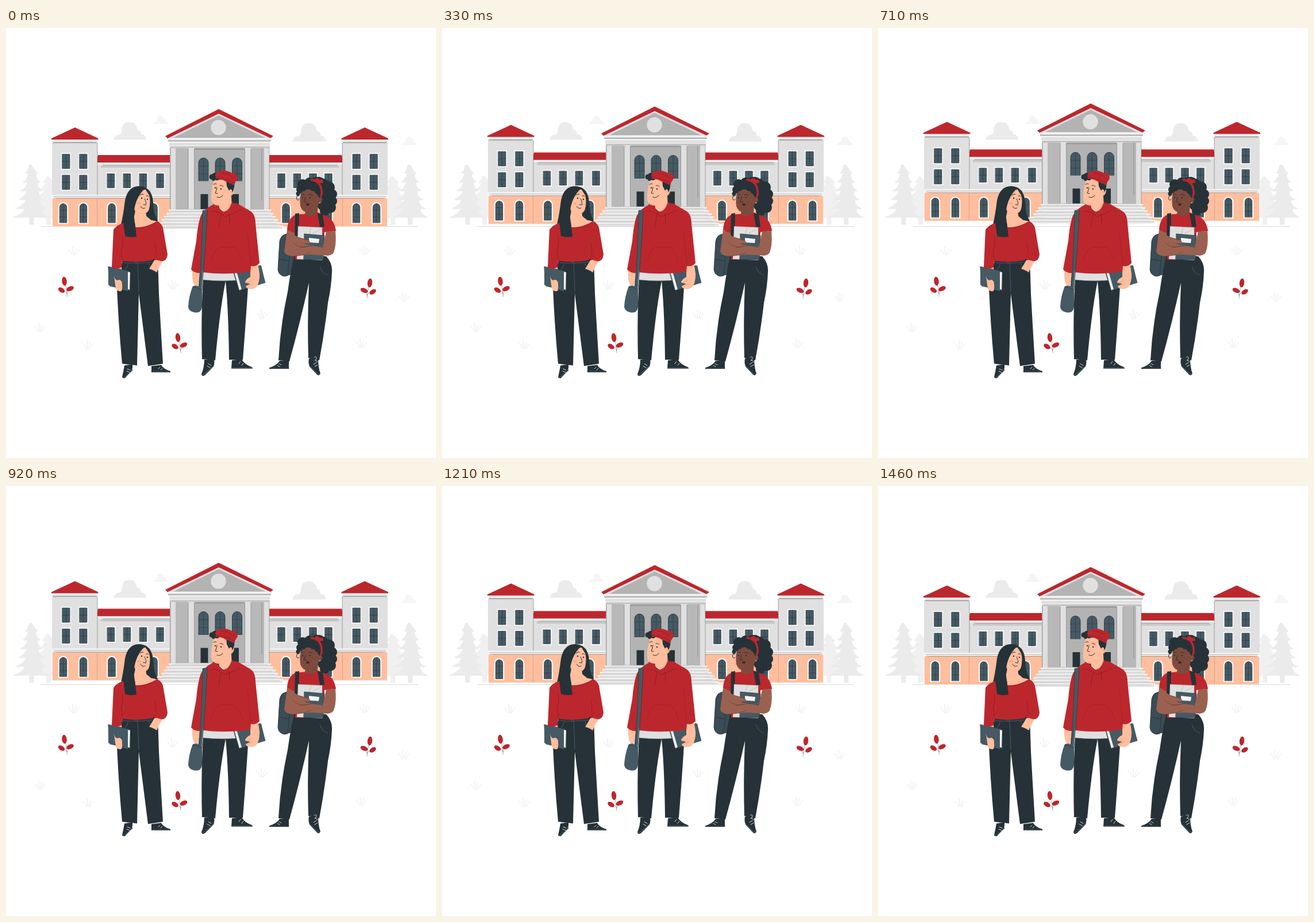
An HTML page for the animation above (1.5 s loop, 748 by 748 pixels).

```html
<!DOCTYPE html>
<html lang="en">
<head>
<meta charset="utf-8">
<title>Students on campus</title>
<style>
html, body { margin: 0; width: 100%; height: 100%; overflow: hidden; background: #fff; }
svg { display: block; width: 100vw; height: 100vh; }
</style>
</head>
<body>
<svg id="stage" viewBox="0 0 748 748"></svg>
<script>
const RED = '#bc272d', DARK = '#263238', SLATE = '#455a64', SKIN = '#ffbe9d', BROWN = '#9b6150',
  FACE = '#7d4b3e', LIGHT = '#e0e0e0', PALE = '#ebebeb', MID = '#c7c7c7', GREY = '#b3b3b3';

const fill = (d, color) => `<path d="${d}" fill="${color}"/>`;
const line = (d, color = DARK, w = .7) =>
  `<path d="${d}" fill="none" stroke="${color}" stroke-width="${w}" stroke-linecap="round" stroke-linejoin="round"/>`;
const rect = (x, y, w, h, color) => `<rect x="${x}" y="${y}" width="${w}" height="${h}" fill="${color}"/>`;
const oval = (x, y, rx, ry, color, turn = 0) =>
  `<ellipse cx="${x}" cy="${y}" rx="${rx}" ry="${ry}" fill="${color}" transform="rotate(${turn} ${x} ${y})"/>`;
const dots = (list, color) => list.map(([x, y, r]) => oval(x, y, r, r, color)).join('');
const place = (x, y, art, scale = '1') => `<g transform="translate(${x} ${y}) scale(${scale})">${art}</g>`;
const mirror = art => place(744, 0, art, '-1 1');

// Scenery
function cloud(x, y, w, color) {
  const k = w / 56;
  return place(x, y, fill('M0 0Q1-9 10-9Q13-10 14-15Q14-31 27-31Q39-31 41-17Q47-18 47-10Q56-9 56 0Z', color), k);
}

function tree(x, top, bottom, color) {
  const h = bottom - top, tiers = 6;
  let left = '', right = '';
  for (let i = 1; i <= tiers; i++) {
    const y = top + h * i / tiers, w = 7 + 4.2 * i, inner = w * .68;
    right += `Q${x + w * .5} ${y - 6} ${x + w} ${y - 1}Q${x + w - 3} ${y + 1} ${x + inner} ${y}`;
    left = `L${x - inner} ${y}Q${x - w + 3} ${y + 1} ${x - w} ${y - 1}Q${x - w * .5} ${y - 6} ${x - inner * .55} ${y - h / tiers}` + left;
  }
  return fill(`M${x} ${top}${right}${left}Z`, color) + rect(x - 4, bottom - 2, 8, 344 - bottom, color);
}

const grass = ([x, y]) => place(x, y,
  line('M-9-3Q-5 1-3 7M-2-8Q-2 0-1 7M4-5Q1 1 1 7M9-2Q5 2 3 7', LIGHT, .7));

const plant = (x, y, flip = 1) => place(x, y,
  line('M-1-8Q2 4 3 17M3 13Q0 6-6 5M3 12Q4 5 10 4', '#888', .7) +
  oval(-2, -9.5, 4.2, 7.7, RED, -7) + oval(-7, 6, 6.3, 3.8, RED, 32) + oval(8, 3.5, 6.8, 3.8, RED, -25), `${flip} 1`);

const scenery = cloud(187.5, 194.5, 56, PALE) + cloud(256, 167, 26, '#f5f5f5') + cloud(498.5, 197.5, 58, PALE) +
  cloud(688, 203.5, 26, '#f5f5f5') +
  tree(74, 258, 330, '#f0f0f0') + tree(44.5, 238, 330, PALE) +
  tree(673, 258, 330, '#f0f0f0') + tree(703, 238, 330, PALE) +
  line('M61 345.5H716', '#d0d0d0', .8);

// Building
const pane = (x, y, w, h) => rect(x - w / 2 - 2, y - 2, w + 4, h + 4, '#fff') + rect(x - w / 2, y, w, h, SLATE) +
  line(`M${x} ${y}v${h}M${x - w / 2} ${y + h / 2}h${w}`, DARK, .6) +
  line(`M${x - w / 2} ${y}h${w}v${h}h${-w}Z`, DARK, .7);

function arch(x, y, w, h, trim) {
  const shape = (r, top, bottom) => `M${x - r} ${bottom}V${top + r}A${r} ${r} 0 0 1 ${x + r} ${top + r}V${bottom}Z`;
  return (trim ? fill(shape(w / 2 + 2.5, y - 2.5, y + h + 2.5), '#fff') : '') +
    fill(shape(w / 2, y, y + h), SLATE) + line(shape(w / 2, y, y + h), DARK, .8) +
    line(`M${x} ${y}v${h}M${x - w / 2} ${y + h * .35}h${w}M${x - w / 2} ${y + h * .7}h${w}`, DARK, .5);
}

const wing =
  rect(158, 237, 129, 58, LIGHT) + rect(160, 234, 130, 4, '#f2f2f2') + rect(165, 239, 122, 4, MID) +
  line('M168 238.5H290', '#777', .6) +
  fill('M160 221H290L292.5 234H157Z', RED) + line('M290 221L292.5 234', DARK, .5) +
  rect(81, 297, 205, 48.5, SKIN) + rect(80, 199, 79, 93, LIGHT) +
  rect(82, 194, 76, 2, LIGHT) + rect(79, 196, 81, 2, '#f4f4f4') + rect(82, 198, 76, 3, MID) +
  line('M82 199H157', '#777', .6) + line('M159 200V291', '#666', .6) +
  fill('M79 194V192L120 173L160.5 192V194Z', RED) +
  rect(79, 290, 207, 6, '#f4f4f4') + rect(83, 292.5, 203, 1.5, MID) + rect(83, 295.5, 203, 1.5, '#d8bcae') +
  line('M88 296.5H286', '#8b7770', .5) +
  [104.5, 134.5].map(x => pane(x, 219.5, 13, 25) + pane(x, 256, 13, 25)).join('') +
  [99.5, 134.5, 184, 257].map(x => arch(x, 305.5, 12.5, 33, true)).join('') +
  line('M158.5 297V345', '#a98a7a', .5) + rect(79, 345, 200, 1, PALE);

const wings = wing + mirror(wing) +
  [182.5, 210.5, 238.5, 268, 479, 506.5, 534, 561].map(x => pane(x, 253.5, 12.5, 24.5)).join('');

const column = x => rect(x, 209, 10.5, 106, LIGHT) + rect(x - 1, 207, 12.5, 3, PALE) +
  line(`M${x} 210V314M${x + 10.5} 210V314`, '#777', .6);

const facade =
  rect(285, 200, 173, 118, '#b8b8b8') + rect(286, 209, 9, 107, LIGHT) + rect(449, 209, 9, 107, LIGHT) +
  line('M286 209V316M458 209V316M445 210V300', '#777', .6) +
  rect(328, 209, 88, 107, GREY) + rect(328, 209, 88, 3, '#9d9d9d') +
  [343.5, 372.5, 402].map(x => arch(x, 226, 17, 39.5)).join('') +
  rect(338.5, 289, 13, 26, DARK) + rect(391, 289, 14, 26, DARK) + rect(360, 289, 24, 26, DARK) +
  column(317) + column(415.5) +
  fill('M279 190L371 144L463 190L461 194H281Z', LIGHT) + fill('M291 191L370 152L451 191Z', GREY) +
  oval(369.5, 173, 13.2, 13.2, LIGHT) +
  rect(280, 191.5, 182, 3, '#f4f4f4') + rect(282, 194.5, 179, 3, MID) + rect(284, 197.5, 175, 2, '#fafafa') +
  rect(284, 199.5, 175, 6, LIGHT) + rect(282, 205, 178, 2, '#fafafa') + rect(285, 207, 174, 2, MID) +
  line('M286 206.5H458M283 197H460', '#888', .6) +
  fill('M277 188L370 141L465 188L460 191.5L370 149L281 192Z', RED);

const stairs = [0, 1, 2, 3, 4, 5].map(i => {
  const y = 316 + i * 5.5, x = 284 - i * 4.2, w = 176 + i * 8.4;
  return rect(x - 1, y, w + 2, 2.2, '#f7f7f7') + rect(x, y + 2.2, w, 3.7, i % 2 ? LIGHT : '#d9d9d9') +
    line(`M${x + 4} ${y + 2.2}h${w - 10}`, '#aaa', .5);
}).join('');

// People
const book = (cover, pages, label) => fill(cover, SLATE) + line(cover, DARK, .6) + fill(pages, '#f2f2f2') + label;

const leftStudent =
  fill('M232 275Q212 275 207 300Q204 325 200 342L240 350L264 336Q256 322 256 303Q254 276 232 275Z', DARK) +
  fill('M225 318L222 332Q207 337 202 344Q230 360 265 337Q250 334 244 327L243 316Z', SKIN) +
  fill('M224 287Q220 309 225 320Q235 327 245 321Q251 316 252 300Q252 286 245 281Q234 280 224 287Z', SKIN) +
  fill('M224 282Q233 276 242 279Q225 294 222 323L227 362Q216 364 206 362L201 341Q209 323 213 301Q216 287 224 282Z', DARK) +
  fill('M241 278Q253 283 253 305Q254 325 264 336L252 334Q246 330 249 316Q252 300 249 291Z', DARK) +
  line('M233 291q3-3 6-2M244 292q3-1 4 1M241 297Q245 305 243 308L239 307M234 310Q238 316 242 313', DARK, 1) +
  dots([[236, 296, 1.2], [246, 298, 1.2]], DARK) + oval(231, 305, 3, 2, '#ffa889') +
  // trousers and shoes
  fill('M206 587L220 585Q221 595 216 599L207 609Q203 610 202 607Q204 599 206 587Z', DARK) +
  fill('M253 588L270 586Q273 593 286 597V599H253Z', DARK) +
  line('M203 608L207 607L220 595M253 597.5H285', SLATE, 1.2) +
  line('M210 597l5 2M211 593l5 2M268 590l-3 3M272 592l-3 3', '#fff', .8) +
  fill('M203 403Q196 430 193 452Q196 520 202 584L228 587L231 462L247 588L273 584Q268 500 266 462L264 401Z', DARK) +
  line('M202 408Q230 411 263 406M229 408L231 458M212 411Q210 420 203 425M249 410Q252 421 262 425', '#71808a', .5) +
  dots([[226, 406, 1.7]], '#53646d') +
  // arms and top
  fill('M188 415Q187 435 193 444Q196 459 201 457Q205 450 201 416Z', SKIN) +
  book('M178 415L215 423L217 457L181 449Z', 'M195 421L216 425L215 455L195 452Z',
    fill('M178 415L212 423V458L178 447Z', SLATE)) +
  fill('M188 431Q190 441 196 438Q202 438 202 446Q203 458 199 458Q191 459 190 447Z', SKIN) +
  fill('M258 404L271 401Q273 407 268 413L262 425Q257 421 249 419Q253 413 258 404Z', SKIN) +
  fill('M205 339Q229 356 263 336Q270 339 273 347L281 394Q280 405 271 406L257 402L255 404Q229 409 202 405L201 416Q192 421 184 416L187 351Q193 342 205 339Z', RED) +
  line('M203 405L200 386Q205 374 202 362M256 402L265 394M259 374Q262 386 260 394M206 340Q231 357 262 337', '#7b1c20', .6) +
  fill('M204 338L224 338L227 363Q215 365 207 362Z', DARK);

const middleStudent =
  // trousers and shoes
  fill('M345 577L362 576Q364 587 358 592L346 604Q341 607 340 602Q345 590 345 577Z', DARK) +
  fill('M393 578L410 576Q414 585 428 590L429 592.5H392Z', DARK) +
  line('M341 604L346 601L361 588M393 591.5H428', SLATE, 1.3) +
  line('M350 588l5 3M352 584l5 3M408 580l-3 4M413 583l-3 4', '#fff', .8) +
  fill('M343 434Q339 500 341 576L364 578Q372 490 382 440Q387 490 388 577L412 577Q418 500 422 434Z', DARK) +
  fill('M342 424H423L420 437Q380 442 343 438Z', LIGHT) + line('M343 438Q380 442 420 437', '#999', .5) +
  // hands and book
  fill('M324 421Q323 438 327 446L332 454Q335 450 334 444L339 440Q340 430 338 423Z', SKIN) +
  book('M396 425L442 413L451 443L405 457Z', 'M397 424L401 423L411 454L406 456Z',
    fill('M401 423L444 413L451 443L410 455Z', SLATE)) +
  fill('M425 411L438 410Q443 430 440 440Q438 452 429 454Q418 455 417 449L425 445L416 443Q416 438 425 433Z', SKIN) +
  line('M419 443l9-4M421 449l9-4', '#d98f72', .6) +
  // hoodie
  fill('M363 306Q343 315 338 329Q333 345 331 371L322 420Q328 427 338 426L343 399L343 425Q380 430 425 424L426 414Q435 416 441 409L434 340Q434 325 426 319L402 305Z', RED) +
  line('M345 355L343 410M420 352L426 413M357 405Q362 386 371 381H398Q407 391 412 407', '#8f1e23', .5) +
  // strap and bag
  fill('M342 317L350 316Q347 375 343 420L340 460L334 458Q341 390 342 317Z', SLATE) +
  fill('M325 449Q334 446 341 454L341 485Q340 495 331 495Q318 494 317 485Q318 466 325 449Z', SLATE) +
  line('M342 318Q341 390 336 450M350 317Q347 390 341 455M324 452Q332 449 340 456', DARK, .6) +
  // head
  fill('M370 300L371 314Q380 324 393 314L392 292Z', SKIN) +
  fill('M373 314L382 321L390 315L385 320L377 321Z', '#fff') +
  fill('M362 304Q355 313 357 320Q369 317 380 328Q394 323 408 317Q407 308 393 303Q389 318 379 320Q369 315 366 305Z', RED) +
  line('M358 319Q369 317 380 328Q394 324 408 317M367 308Q371 317 380 320Q389 316 392 306M374 323L370 348M388 324L389 340', '#7b1c20', .6) +
  fill('M362 264Q356 283 357 298Q358 309 371 309Q384 307 388 293Q396 292 397 283Q396 277 390 279L389 264Z', SKIN) +
  fill('M383 264H398Q398 278 394 286Q392 277 388 283L384 275Z', DARK) +
  dots([[358, 259, 4.5], [363, 257, 5], [367, 261, 4], [361, 263, 3]], DARK) +
  fill('M364 256Q367 248 379 248Q394 249 399 259L397 274Q391 270 382 267Q374 262 365 262Z', RED) +
  fill('M397 251Q403 255 403 262L397 271L391 258Z', RED) +
  line('M365 259Q379 260 398 270M375 252Q388 253 396 261', '#7b1c20', .6) +
  line('M361 272q3-2 5-1M372 274q4-1 6 2M367 277Q366 284 364 287L368 288M367 294Q373 297 377 291', DARK, 1) +
  dots([[364, 278, 1.2], [374, 280, 1.2]], DARK) + line('M390 284q4 0 3 5', '#d98f72', .7);

const curls = [[516, 272, 9], [528, 269, 9], [540, 267, 8], [552, 271, 9], [562, 277, 10], [567, 289, 9], [568, 301, 8],
  [564, 312, 10], [554, 319, 8], [544, 271, 12], [555, 290, 16], [554, 306, 13], [511, 281, 6], [508, 288, 3.5], [520, 280, 7]];

const rightStudent =
  // backpack
  fill('M490 358Q478 359 476 371L473 420Q474 430 484 432L501 428V359Z', '#3a4c55') +
  line('M490 358Q478 359 476 371L473 420Q474 430 484 432L490 431L496 365M476 402L491 405', DARK, .8) +
  // shoes and trousers
  fill('M476 579H492V593H458V591Q471 587 476 579Z', DARK) +
  fill('M527 575L543 574Q543 591 547 601Q545 606 541 603L529 590Q525 584 527 575Z', DARK) +
  line('M459 592H492M528 588L542 602L546 601', SLATE, 1.2) +
  line('M475 584l4 2M472 587l4 2M535 585l5-3M537 589l5-3', '#fff', .8) +
  fill('M501 397L557 397Q568 409 567 424Q566 450 560 478Q554 530 545 578L526 574Q524 510 527 443Q511 515 493 580L474 578Q477 519 490 459Q495 423 501 397Z', DARK) +
  line('M546 415Q549 426 560 430', '#71808a', .5) +
  line('M536 573q4-3 4 1t-3 4q4 0 5 3', '#fff', .7) +
  // shirt and neck
  dots(curls, DARK) +
  fill('M503 325Q490 331 489 351L502 359L503 403H552L554 355L574 353Q571 333 557 327L543 321Z', RED) +
  fill('M522 309L520 323Q528 332 542 322L543 302Z', FACE) +
  fill('M503 323L510 322L509 365H502ZM542 322L551 324L554 346H546Z', DARK) +
  // papers and folder
  fill('M508 345L550 347V404L506 402Z', LIGHT) + line('M508 345L550 347V404', '#aaa', .6) +
  line('M531 347L527 360M534 357L548 350', '#aaa', .6) +
  fill('M519 358L554 361L552 403H518Z', SLATE) + line('M519 358L554 361L552 403H518Z', DARK, .6) +
  fill('M527 365L545 367L544 374L527 373Z', '#f5f5f5') +
  // folded arms
  fill('M489 351L502 357L501 369L512 375L551 382L557 354L573 353Q575 375 571 387Q570 395 560 396L529 394L498 397Q485 396 484 388Z', BROWN) +
  fill('M497 363Q501 358 508 364L526 369Q531 372 528 375L519 374L525 380L512 382Q500 380 499 373Z', BROWN) +
  line('M499 373Q509 384 525 380M512 382L550 376M508 364L527 370M551 376L554 363M498 397Q519 396 530 390', '#6c3c2e', .7) +
  // head
  fill('M514 281Q510 297 512 310Q515 320 525 321Q538 320 544 306Q550 304 550 298Q549 293 544 295L542 276Q528 271 514 281Z', FACE) +
  dots([[517, 278, 6], [525, 274, 7], [535, 276, 8], [543, 282, 7], [546, 288, 5], [511, 283, 5], [508, 290, 2.5], [513, 273, 5]], DARK) +
  line('M531 264Q543 266 547 275Q551 285 548 293', RED, 3.5) + fill('M536 264Q542 258 546 264Q552 262 552 269L545 271Z', RED) +
  line('M514 290q3-2 5 0M526 290q4-2 7 1M521 294Q520 300 518 302L523 303', DARK, 1) +
  dots([[516, 295, 1.2], [529, 295, 1.2]], DARK) + oval(525, 307, 3, 2, '#4b251f') +
  line('M507 292q-3 3-1 6t4 0', DARK, 1) + dots([[546, 304, 1.1]], '#e6b36a');

const tufts = [[118, 388], [290, 447], [59, 521], [143, 551], [446, 499], [618, 549], [692, 468], [624, 387]];

const stage = document.getElementById('stage');
stage.innerHTML = scenery + `<g id="building">${wings}${facade}${stairs}</g>` +
  tufts.map(grass).join('') + plant(103.5, 450) + plant(301, 548) + plant(631, 453, -1) +
  leftStudent + middleStudent + rightStudent;

// The building rises and sinks evenly, then rests until the loop ends.
const building = document.getElementById('building');
const LOOP = 1500, MOVE = 1460, LIFT = 10;

function draw() {
  const phase = Math.min(performance.now() % LOOP / MOVE, 1);
  const y = -LIFT * (1 - Math.abs(1 - 2 * phase));
  building.setAttribute('transform', `translate(0 ${y.toFixed(2)})`);
  requestAnimationFrame(draw);
}
draw();
</script>
</body>
</html>
```
